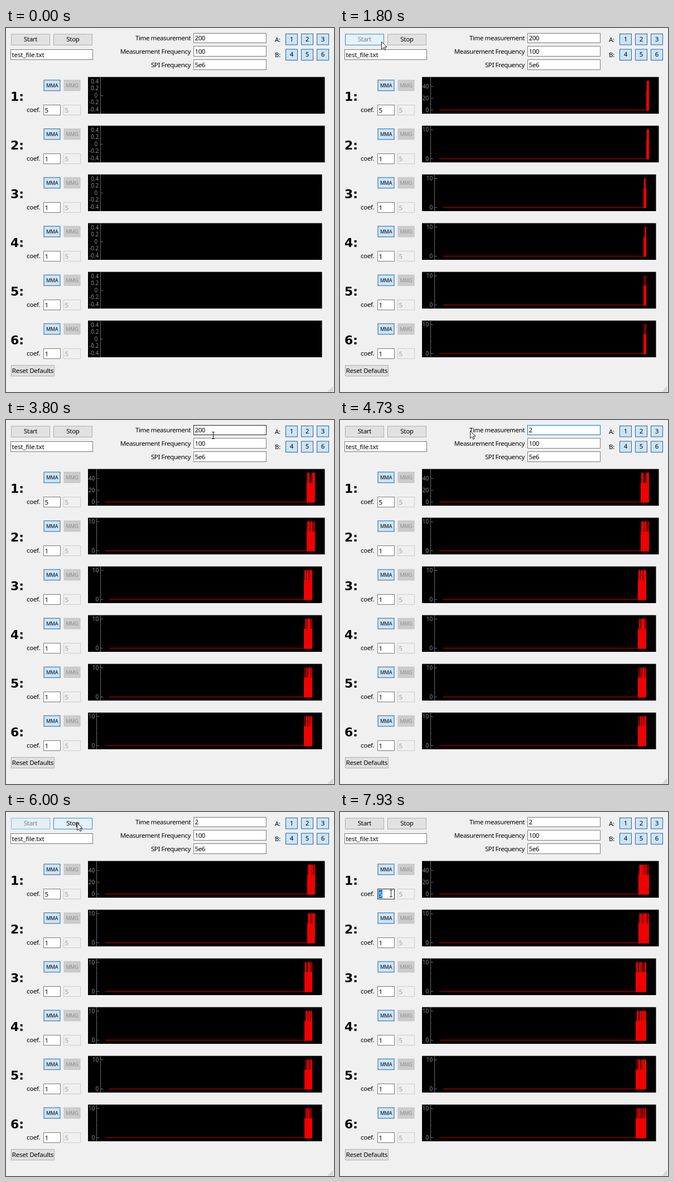
Write an HTML page with a canvas that moves like this. It is 588 by 650 pixels and loops after 8000 ms.

```html
<!DOCTYPE html>
<html lang="en">
<head>
<meta charset="utf-8">
<title>Sensor panel</title>
<style>
html, body { margin: 0; width: 100%; height: 100%; overflow: hidden; background: #f0f0f0; }
canvas { display: block; }
</style>
</head>
<body>
<canvas id="stage" width="588" height="650"></canvas>
<script>
const ctx = document.getElementById('stage').getContext('2d');
const LOOP = 8000, STEP = 1000 / 15;
const SANS = '"Noto Sans", "Open Sans", sans-serif';
const BOLD = 'bold 22px "DejaVu Sans", sans-serif';

const RUNS = [{ click: 1390, start: 1467, stop: 2480 }, { click: 5000, start: 5070, stop: 6340 }];
const SPEED = 0.015; // pixels of trace per millisecond

const FILE = [8, 38, 155, 56];
const TIME = [336, 9, 466, 26];
const COEF = [67, 137, 97, 155];
const START = [9, 10.5, 78, 30];
const STOP = [85, 10.5, 154, 30];

const HOVER = { fill: '#e5f1fb', edge: '#2b8bdb' };
const FADED = { fill: '#e4eef6', edge: '#7db9e8' };
const PLAIN = { fill: '#e1e1e1', edge: '#adadad' };
const CHECKED = { fill: '#cce4f7', edge: '#1f66a5' };
const OFF = { fill: '#cccccc', edge: '#c3c3c3' };

// pointer stops: time, x, y
const PATH = [
  [70, 556, 597], [300, 300, 300], [530, 30, 72], [800, 42, 24], [1600, 42, 24],
  [2130, 143, 23], [2530, 143, 23], [2870, 500, 240], [3130, 540, 560],
  [3270, 545, 420], [3730, 371, 28], [3930, 371, 24], [4200, 338, 18],
  [4600, 338, 18], [4930, 44, 22], [5400, 44, 22], [5800, 127, 19],
  [6400, 127, 19], [6800, 535, 470], [7130, 500, 250], [7530, 120, 44],
  [7800, 91, 145]
];

function pointerAt(t) {
  if (t < PATH[0][0]) return null;
  const i = PATH.findIndex(p => p[0] > t);
  if (i < 0) return PATH[PATH.length - 1].slice(1);
  const [t0, x0, y0] = PATH[i - 1], [t1, x1, y1] = PATH[i];
  const u = (t - t0) / (t1 - t0), e = u * u * (3 - 2 * u);
  return [Math.round(x0 + (x1 - x0) * e), Math.round(y0 + (y1 - y0) * e)];
}

function inside(p, [x0, y0, x1, y1], pad = 0) {
  return !!p && p[0] >= x0 - pad && p[0] <= x1 + pad && p[1] >= y0 - pad && p[1] <= y1 + pad;
}

function hash(n) {
  const s = Math.sin(n * 127.1 + 3.7) * 43758.5453;
  return s - Math.floor(s);
}

function rect(x, y, w, h, color) {
  ctx.fillStyle = color;
  ctx.fillRect(x, y, w, h);
}

function box([x0, y0, x1, y1], fill, edge) {
  rect(x0, y0, x1 - x0 + 1, y1 - y0 + 1, edge);
  rect(x0 + 1, y0 + 1, x1 - x0 - 1, y1 - y0 - 1, fill);
}

function text(s, x, y, { size = 11.5, color = '#000', align = 'left', gap = -0.3, font } = {}) {
  ctx.font = font || `${size}px ${SANS}`;
  ctx.letterSpacing = gap + 'px';
  ctx.textAlign = align;
  ctx.fillStyle = color;
  ctx.fillText(s, x, y);
}

function button(r, label, style, opts = {}) {
  box(r, style.fill, style.edge);
  const drop = opts.size ? 3.5 : 4;
  text(label, (r[0] + r[2] + 1) / 2, Math.round((r[1] + r[3]) / 2 + drop), { align: 'center', ...opts });
}

function field(r, value, edge = '#7a7a7a', selected = false) {
  box(r, '#fff', edge);
  const base = r[3] - 4;
  if (selected) rect(r[0] + 2, r[1] + 2, value.length * 6 + 1, r[3] - r[1] - 3, '#0078d7');
  text(value, r[0] + 2.5, base, { color: selected ? '#fff' : '#000', gap: value.length > 5 ? -0.1 : -0.4 });
}

function header(t, p) {
  const clicked = RUNS.some(r => t >= r.click && t < r.stop);
  const onStart = inside(p, START), onStop = inside(p, STOP);
  const startStyle = onStart ? HOVER : clicked ? FADED : PLAIN;
  button(START, 'Start', startStyle, { color: clicked ? '#7c7c7c' : '#000' });
  button(STOP, 'Stop', onStop ? HOVER : PLAIN);

  const fileHot = inside(p, FILE) || (t > 700 && t < 1330);
  field(FILE, 'test_file.txt', fileHot ? '#222' : undefined);

  const right = { align: 'right', gap: -0.4 };
  text('Time measurement', 331, 22, right);
  text('Measurement Frequency', 331, 46, right);
  text('SPI Frequency', 331, 70, right);
  const editing = t >= 4000 && t < 5000;
  const timeEdge = editing ? '#0078d7' : inside(p, TIME, 3) ? '#222' : undefined;
  field(TIME, t < 4460 ? '200' : '2', timeEdge, t >= 4200 && t < 4460);
  field([336, 32, 466, 50], '100');
  field([336, 56, 466, 74], '5e6');

  ['A:', 'B:'].forEach((name, row) => {
    text(name, 482, 25 + row * 27);
    for (let i = 0; i < 3; i++) {
      const x = 501 + i * 28, y = 10 + row * 27.5;
      button([x, y, x + 21, y + 19.5], String(row * 3 + i + 1), CHECKED);
    }
  });
}

function channel(i, t, p) {
  const dy = i * 87;
  text(i + 1 + ':', 8, 130 + dy, { font: BOLD, gap: 0 });
  button([67.5, 92.5 + dy, 96.5, 111.5 + dy], 'MMA', CHECKED, { size: 9 });
  button([103.5, 92.5 + dy, 132.5, 111.5 + dy], 'MMG', OFF, { size: 9, color: '#8c8c8c' });
  text('coef.', 37, 150 + dy);
  const r = [67, 137 + dy, 97, 155 + dy];
  const picked = i === 0 && t >= 7860;
  field(r, i ? '1' : '5', inside(p, r, 1) ? '#222' : undefined, picked);
  box([103, 137 + dy, 133, 155 + dy], '#f0f0f0', '#cccccc');
  text('5', 105.5, 151 + dy, { color: '#9a9a9a' });
}

function tickLabel(s, axis, y) {
  text(s, axis - 3, y + 3.5, { size: 10, color: '#8c8c8c', align: 'right', gap: -0.1 });
}

function plot(i, t) {
  const top = 88 + i * 87, edge = i < 2 ? 571 : 566;
  rect(147, top - 0.5, edge - 146.5, 65.5, '#000');
  const run = RUNS[0].start > t ? -1 : t < RUNS[1].click ? 0 : 1;
  const line = '#6a6a6a';

  if (run < 0) {
    rect(169, top, 1, 65, line);
    rect(169, top + 32, 5, 1, line);
    ['0.4', '0.2', '0', '-0.2', '-0.4'].forEach((s, k) =>
      tickLabel(s, k === 2 ? 167 : 169, top + 7 + k * 12.5));
    return;
  }

  const wide = i === 4 || (run === 0 && (i === 2 || i === 3));
  const axis = wide ? 169 : 162;
  const base = top + 58, full = 52;
  rect(axis, top, 1, 65, line);
  const marks = i ? [['10', 6], ['0', 58]] : [['40', 16], ['20', 37], ['0', 58]];
  for (const [s, y] of marks) {
    tickLabel(s, axis, top + y);
    rect(axis, top + y, 5, 1, line);
  }
  for (let k = 1; k < 5; k++) rect(axis, top + 58 - Math.round(k * 10.4), 2, 1, '#484848');

  const end = edge - 17;
  const { start, stop } = RUNS[run];
  const width = Math.round(Math.max(0, Math.min(t, stop) - start) * SPEED);
  const x0 = axis + 16;
  rect(x0, base - 0.5, end - x0, 2, '#7a0000');

  // each column holds many fast swings between zero and one of two levels
  for (let k = 0; k < width; k++) {
    const seed = k + i * 61 + run * 409;
    const low = Math.round(full * 0.65);
    const x = end - width + k;
    rect(x, base - low, 1, low + 1.5, '#f20000');
    const r = k === 0 ? 0 : hash(seed);
    if (r > 0.16) rect(x, base - full, 1, full - low, r > 0.36 ? '#f20000' : '#900000');
  }
}

function arrow(x, y) {
  const size = 0.83;
  const pts = [[0, 0], [0, 16], [4, 12.5], [6.5, 18], [9, 17], [6.5, 11.5], [11.5, 11.5]];
  ctx.beginPath();
  pts.forEach(([a, b]) => ctx.lineTo(x + a * size + 0.5, y + b * size + 0.5));
  ctx.closePath();
  ctx.fillStyle = '#fff';
  ctx.fill();
  ctx.lineWidth = 1;
  ctx.strokeStyle = '#222';
  ctx.stroke();
}

function beam(x, y) {
  rect(x, y - 6, 1, 13, '#222');
  for (const end of [y - 6, y + 6]) {
    rect(x - 2, end, 2, 1, '#222');
    rect(x + 1, end, 2, 1, '#222');
  }
}

function grip() {
  for (let r = 0; r < 3; r++)
    for (let c = 2 - r; c < 3; c++) rect(578 + c * 3, 641 + r * 3, 2, 2, '#bdbdbd');
}

function draw(t) {
  const p = pointerAt(t);
  rect(0, 0, 588, 650, '#f0f0f0');
  header(t, p);
  for (let i = 0; i < 6; i++) {
    channel(i, t, p);
    plot(i, t);
  }
  button([9, 602, 86, 621], 'Reset Defaults', PLAIN, { gap: -0.25 });
  grip();
  if (!p) return;
  const overText = inside(p, FILE) || inside(p, TIME, 3) || inside(p, COEF);
  (overText ? beam : arrow)(p[0], p[1]);
}

function tick() {
  const t = performance.now() % LOOP;
  draw(Math.floor((t + 4) / STEP) % 120 * STEP);
  requestAnimationFrame(tick);
}
tick();
</script>
</body>
</html>
```
